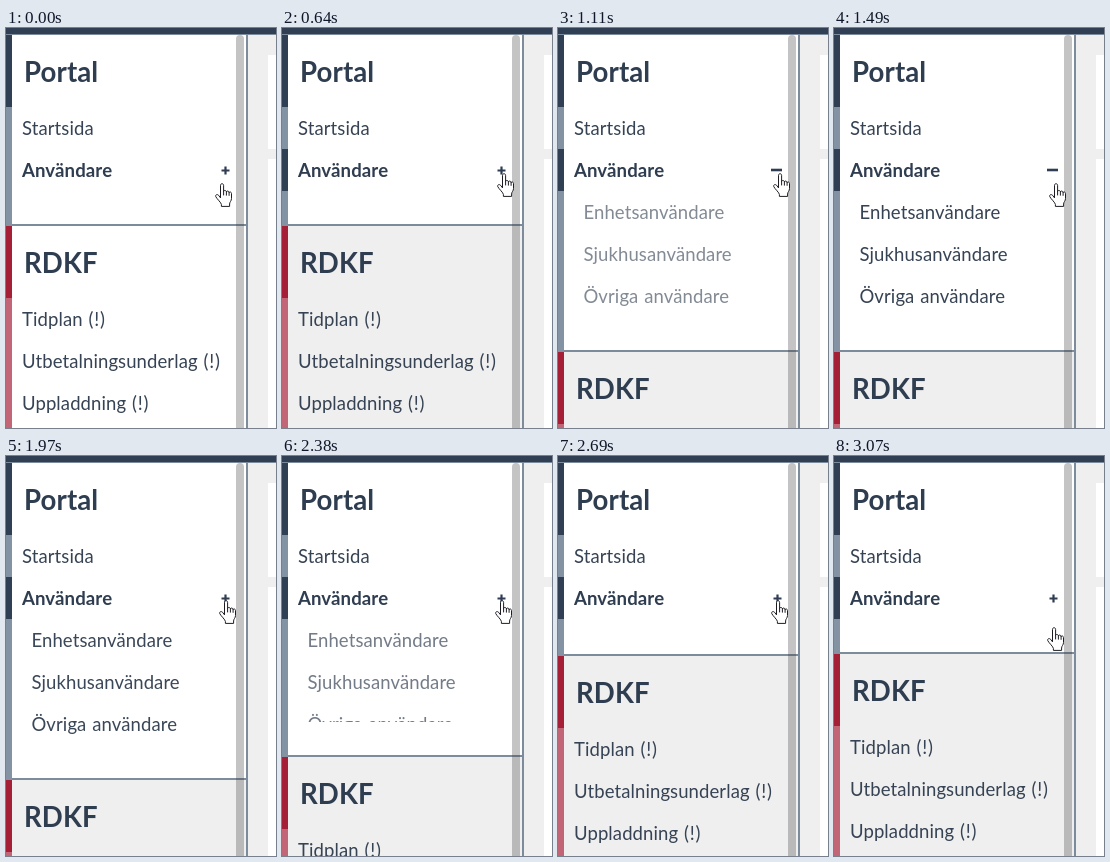
An HTML page for the animation above (3140 ms loop, 270x400 px).

```html
<!DOCTYPE html>
<html lang="sv">
<head>
<meta charset="utf-8">
<title>Portal</title>
<style>
  html, body { margin: 0; width: 100%; height: 100%; overflow: hidden; background: #efefef; }
  svg { display: block; }
  text { font: 400 18.5px Lato, Carlito, sans-serif; letter-spacing: .1px; word-spacing: 1px; fill: #364354; }
  .mark { letter-spacing: .8px; }
  .head { font-size: 27.6px; font-weight: 700; fill: #2f3d50; }
  .open { font-size: 18.6px; font-weight: 700; fill: #2f3d50; }
  .navy { fill: #313f54; }
  .slate { fill: #8493a3; }
  .line { fill: #7d8c9d; }
  .white { fill: #fff; }

  .hover, .panel, .fold, .items, .plus, .minus, .hand {
    animation: 3140ms step-end infinite;
  }
  .hover { animation-name: hover; }
  .panel { animation-name: panel; }
  .fold  { animation-name: fold; }
  .items { animation-name: items; }
  .plus  { animation-name: plus; }
  .minus { animation-name: minus; }
  .hand  { animation-name: hand; }

  @keyframes hover {
    0% { opacity: 0; }
    2.86% { opacity: .35; }
    5.41% { opacity: .75; }
    8.28%, 100% { opacity: 1; }
  }
  @keyframes panel {
    0% { fill: #fff; }
    2.86% { fill: #fafafa; }
    5.41% { fill: #f4f4f4; }
    8.28%, 100% { fill: #efefef; }
  }
  @keyframes fold {
    0% { transform: translateY(0); }
    24.84% { transform: translateY(3px); }
    27.38% { transform: translateY(28px); }
    29.93% { transform: translateY(71px); }
    32.48% { transform: translateY(110px); }
    35.35% { transform: translateY(126px); }
    73.24% { transform: translateY(122px); }
    75.79% { transform: translateY(103px); }
    78.34% { transform: translateY(74px); }
    80.57% { transform: translateY(44px); }
    83.12% { transform: translateY(17px); }
    85.66% { transform: translateY(2px); }
    88.21%, 100% { transform: translateY(0); }
  }
  @keyframes items {
    0% { opacity: 0; }
    27.38% { opacity: .12; }
    29.93% { opacity: .28; }
    32.48% { opacity: .45; }
    35.35% { opacity: .62; }
    37.57% { opacity: .76; }
    40.12% { opacity: .92; }
    47.45% { opacity: 1; }
    62.73% { opacity: .98; }
    68.15% { opacity: .92; }
    73.24% { opacity: .8; }
    75.79% { opacity: .7; }
    78.34% { opacity: .58; }
    80.57% { opacity: .47; }
    83.12% { opacity: .33; }
    85.66% { opacity: .18; }
    88.21%, 100% { opacity: 0; }
  }
  @keyframes plus {
    0% { opacity: 1; }
    24.84% { opacity: 0; }
    62.73%, 100% { opacity: 1; }
  }
  @keyframes minus {
    0% { opacity: 0; }
    24.84% { opacity: 1; }
    62.73%, 100% { opacity: 0; }
  }
  @keyframes hand {
    0% { transform: translate(209px, 155px); }
    2.86% { transform: translate(211px, 152px); }
    5.41% { transform: translate(212px, 148px); }
    8.28% { transform: translate(213px, 145px); }
    20.38% { transform: translate(215px, 145px); }
    47.45% { transform: translate(215px, 155px); }
    49.68% { transform: translate(214px, 149px); }
    52.86% { transform: translate(213px, 144px); }
    97.77%, 100% { transform: translate(213px, 171px); }
  }
</style>
</head>
<body>
<svg width="270" height="400" viewBox="0 0 270 400">
  <!-- page behind the menu -->
  <rect width="270" height="400" fill="#efefef"/>
  <rect class="white" x="262" y="27" width="8" height="94"/>
  <rect class="white" x="262" y="131" width="8" height="269"/>

  <!-- first section -->
  <rect class="white" x="6" y="7" width="234" height="393"/>
  <rect class="navy" y="7" width="6" height="72"/>
  <rect class="slate" y="79" width="6" height="321"/>
  <rect class="navy hover" y="121" width="6" height="42"/>
  <text class="head" x="18" y="54">Portal</text>
  <text x="16" y="107">Startsida</text>
  <text class="open" x="16" y="149">Användare</text>
  <path class="plus" d="M215.5 142.5h8M219.5 138.5v8" stroke="#2f3d54" stroke-width="2.2"/>
  <path class="minus" d="M213 142h11" stroke="#2f3d54" stroke-width="2.6"/>
  <g class="items">
    <text x="25.5" y="191">Enhetsanvändare</text>
    <text x="25.5" y="233">Sjukhusanvändare</text>
    <text x="25.5" y="275">Övriga användare</text>
  </g>

  <!-- second section slides down and covers the closed list -->
  <g class="fold">
    <rect class="white" x="6" y="163" width="234" height="33"/>
    <rect class="panel" x="6" y="198" width="234" height="202"/>
    <rect class="line" x="6" y="196" width="236" height="2"/>
    <rect y="198" width="6" height="72" fill="#a51f37"/>
    <rect y="270" width="6" height="130" fill="#c26577"/>
    <text class="head" x="18" y="245">RDKF</text>
    <text x="16" y="298">Tidplan <tspan class="mark">(!)</tspan></text>
    <text x="16" y="340">Utbetalningsunderlag <tspan class="mark">(!)</tspan></text>
    <text x="16" y="382">Uppladdning <tspan class="mark">(!)</tspan></text>
  </g>

  <!-- frame and scrollbar -->
  <rect class="line" x="240" y="7" width="2" height="393"/>
  <rect x="230" y="7" width="8" height="400" rx="4" fill="#3c3c3c" fill-opacity=".3"/>
  <rect class="navy" width="270" height="6"/>
  <rect class="line" y="6" width="270" height="1"/>

  <g class="hand" fill="#fff" stroke="#1c1c24" stroke-linejoin="round" stroke-linecap="round">
    <path d="M5.5 14.5V2.3C5.5 .2 8.6 .2 8.6 2.3V8.4C8.8 7 11.4 7.1 11.4 8.9C11.6 7.6 14.1 7.8 14.1 9.6C14.4 8.5 16.5 8.8 16.5 10.5V15.5C16.5 18 14.6 19 14.6 21V23.4H6.4V21.5C6.4 19.8 1.8 15.8 .8 13.7C.1 12 2 10.7 3.3 12Z"/>
    <path d="M8.6 8.4V12M11.4 8.9V12.2M14.1 9.6V12.4" fill="none"/>
  </g>
</svg>
</body>
</html>
```
